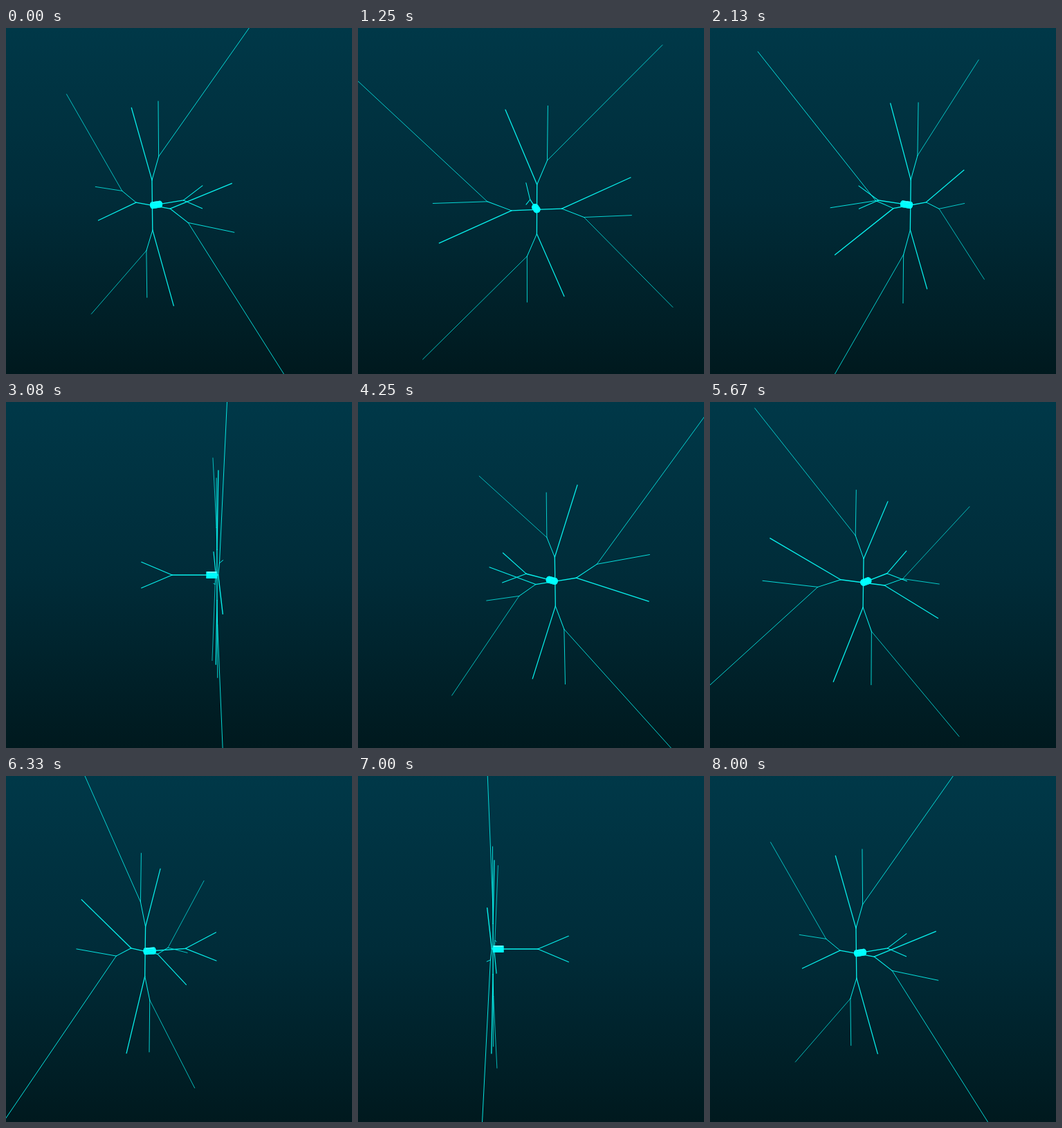
An HTML page with a canvas that plays this animation: 500 by 500 pixels, repeating every 8040 ms.

```html
<!DOCTYPE html>
<html lang="en">
<head>
<meta charset="utf-8">
<title>Turning branches</title>
<style>
html, body { margin: 0; width: 100%; height: 100%; overflow: hidden; background: #002c39; }
canvas { display: block; width: 500px; height: 500px; }
</style>
</head>
<body>
<canvas id="stage" width="500" height="500"></canvas>
<script>
const ctx = document.getElementById('stage').getContext('2d');
const LOOP = 8040, FPS = 24, STEPS = 192;
const RADIUS = 542, TILT = 0.25, START = -46.9, FOCAL = 539.5;
const ORBIT_Z = -7, TARGET_Z = -55;   // orbit round the body, look at the stem
const BODY = { r: 5, back: -15.3 };

// Segments: [from, to, width]; the star lies in the plane z = 0.
const segments = [];
const add = (a, b, w) => segments.push([a, b, w]);

for (let i = 0; i < 4; i++) {
  const c = [1, 0, -1, 0][i], s = [0, 1, 0, -1][i];
  const at = (x, y) => [x * c + y * s, y * c - x * s, 0];
  const node = at(0, 36.5), fork = at(14.4, 70.3);
  add([0, 0, 0], node, 1.3);
  add(node, at(-43, 139), 1.25);
  add(node, fork, 1);
  add(fork, at(14.5, 144.2), 0.85);
  add(fork, at(173, 225.2), 0.78);
}
const stemEnd = [0, 0, -65];
add([0, 0, -14], stemEnd, 1.4);
add(stemEnd, [0, 19, -110], 1.1);
add(stemEnd, [0, -19, -110], 1.1);

const sky = ctx.createLinearGradient(0, 0, 0, 500);
sky.addColorStop(0, '#003848');
sky.addColorStop(0.5, '#002c39');
sky.addColorStop(1, '#00191e');

// Returns a projector from space to [screen x, screen y, scale].
function camera(phi) {
  const flat = RADIUS * Math.cos(phi);
  const k = Math.sqrt(1 - TILT * TILT);
  const cx = -RADIUS * Math.sin(phi), cy = flat * TILT;
  const cz = flat * k + ORBIT_Z - TARGET_Z;
  const ground = Math.hypot(cx, cz), dist = Math.hypot(ground, cy);
  const sa = -cx / ground, ca = cz / ground;
  const se = cy / dist, ce = ground / dist;
  return ([x, y, z]) => {
    z -= TARGET_Z;
    const toward = z * ca - x * sa;
    const scale = FOCAL / (dist - toward * ce - y * se);
    return [
      250 + (x * ca + z * sa) * scale,
      250 - (y * ce - toward * se) * scale,
      scale
    ];
  };
}

function line(a, b, width, color) {
  ctx.strokeStyle = color;
  ctx.lineWidth = width;
  ctx.beginPath();
  ctx.moveTo(a[0], a[1]);
  ctx.lineTo(b[0], b[1]);
  ctx.stroke();
}

function drawBody(project) {
  const { r, back } = BODY, n = 20;
  const rim = (i, z) => {
    const t = i / n * 2 * Math.PI;
    return project([r * Math.cos(t), r * Math.sin(t), z]);
  };
  const fill = pts => {
    ctx.beginPath();
    pts.forEach(p => ctx.lineTo(p[0], p[1]));
    ctx.closePath();
    ctx.fill();
  };
  ctx.fillStyle = '#00ffff';
  for (const z of [0, back]) fill(Array.from({ length: n }, (_, i) => rim(i, z)));
  for (let i = 0; i < n; i++) {
    fill([rim(i, 0), rim(i + 1, 0), rim(i + 1, back), rim(i, back)]);
  }
  // soft light along the upper edge
  const a = project([0, 4, -1]), b = project([0, 4, back + 1]);
  const side = Math.min(1, Math.abs(a[0] - b[0]) / 13.3);
  line(a, b, 1.6, `rgba(190,255,255,${0.7 * side ** 4})`);
}

function draw(ms) {
  const step = Math.min(STEPS, Math.floor((ms + 5) * FPS / 1000));
  const project = camera((START + step * 360 / STEPS) * Math.PI / 180);
  ctx.fillStyle = sky;
  ctx.fillRect(0, 0, 500, 500);
  ctx.lineCap = 'round';
  for (const [from, to, width] of segments) {
    const a = project(from), b = project(to);
    line(a, b, width * Math.sqrt((a[2] + b[2]) / 2), '#08f0ec');
  }
  ctx.lineCap = 'butt';
  drawBody(project);
}

const begin = performance.now();
function tick() {
  draw((performance.now() - begin) % LOOP);
  requestAnimationFrame(tick);
}
tick();
</script>
</body>
</html>
```
